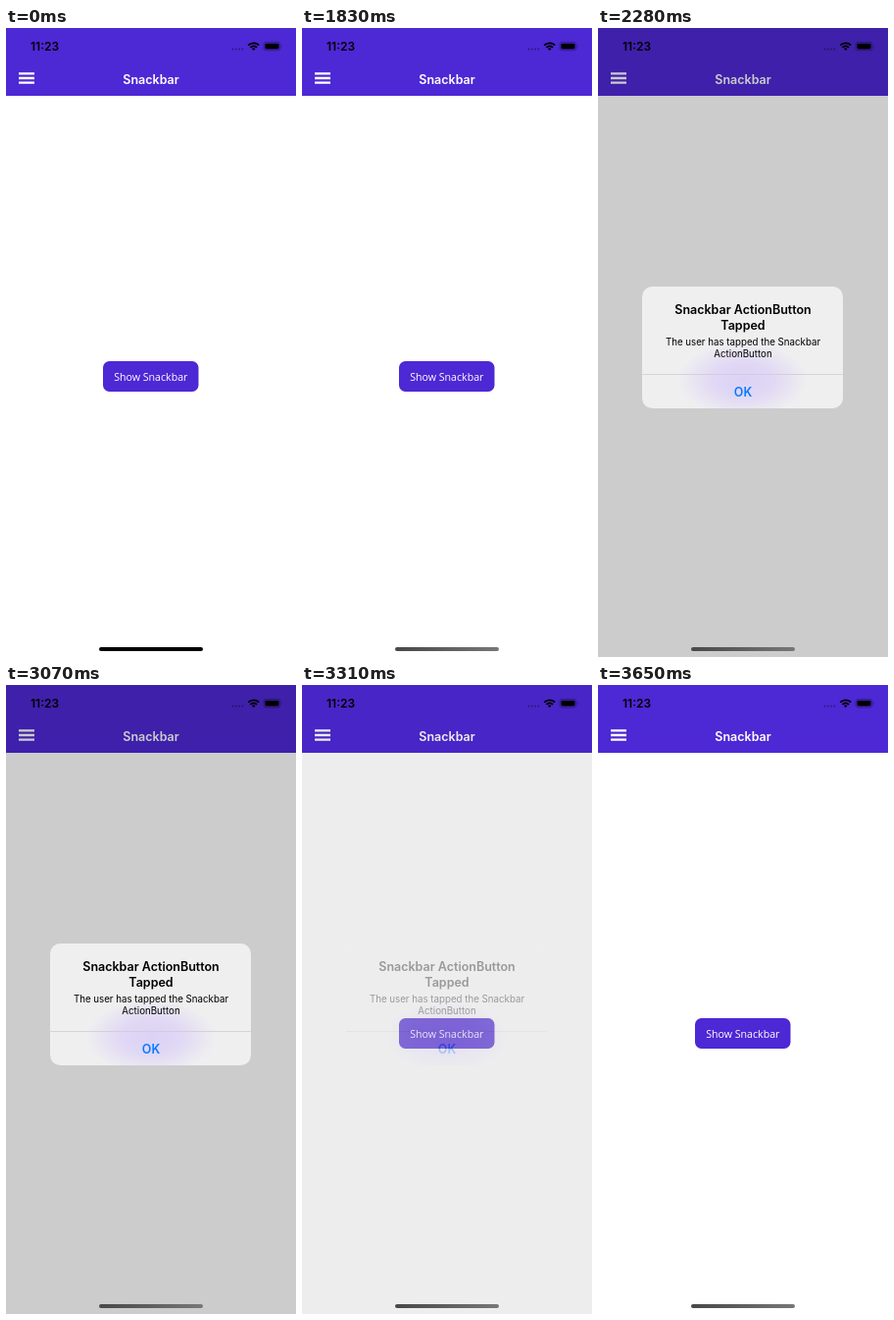
Animation of 296x640 px, one loop 3.67 s. Source, as an HTML page:

```html
<!DOCTYPE html>
<html lang="en">
<head>
<meta charset="utf-8">
<title>Snackbar</title>
<style>
  html, body { margin: 0; width: 100%; height: 100%; overflow: hidden; background: #fff; }
  svg { display: block; width: 296px; height: 640px; font-family: Inter, sans-serif; }
  .bold { font-weight: 600; font-size: 12.5px; }
  .middle { text-anchor: middle; }
</style>
</head>
<body>
<svg viewBox="0 0 296 640">
  <defs>
    <radialGradient id="glow">
      <stop offset="0" stop-color="#dcd2f6"/>
      <stop offset=".45" stop-color="#dcd2f6" stop-opacity=".8"/>
      <stop offset="1" stop-color="#dcd2f6" stop-opacity="0"/>
    </radialGradient>
    <linearGradient id="worn">
      <stop offset="0" stop-color="#484848"/>
      <stop offset="1" stop-color="#777"/>
    </linearGradient>
    <clipPath id="card"><rect x="45" y="263" width="205" height="124" rx="10.5"/></clipPath>
  </defs>

  <rect width="296" height="640" fill="#fff"/>
  <rect width="296" height="69" fill="#4d28d5"/>
  <path d="M13 46.4h16M13 51h16M13 55.6h16" stroke="#fff" stroke-width="2.3"/>
  <text class="bold middle" x="148" y="57" fill="#fff">Snackbar</text>
  <rect x="99" y="339" width="97.5" height="31" rx="6.5" fill="#4d28d5"/>
  <text class="middle" x="147.8" y="358.6" fill="#fff" font-size="10.63" font-family="Open Sans, sans-serif">Show Snackbar</text>

  <g id="snackbar">
    <rect x="30.5" y="543" width="235" height="56" rx="8" fill="#f00"/>
    <g fill="#2f6a00" font-size="10.6" font-weight="500" letter-spacing="3">
      <text x="46" y="569">This is a</text>
      <text x="46" y="581">Snackbar</text>
    </g>
    <text x="146" y="575" fill="#ff0" font-size="10.35">Click Here to Dismiss</text>
  </g>

  <rect id="dim" width="296" height="640" fill="#000"/>

  <g id="alert">
    <g clip-path="url(#card)">
      <rect x="45" y="263" width="205" height="124" fill="#efeff0"/>
      <ellipse cx="148" cy="358" rx="66" ry="38" fill="url(#glow)"/>
    </g>
    <path d="M45 352.5h205" stroke="#cfccd6" stroke-width=".8"/>
    <g class="middle">
      <g class="bold">
        <text x="148" y="291">Snackbar ActionButton</text>
        <text x="148" y="307">Tapped</text>
        <text x="148" y="374.6" fill="#0a7aff">OK</text>
      </g>
      <g font-size="9.72">
        <text x="148" y="323">The user has tapped the Snackbar</text>
        <text x="148" y="335">ActionButton</text>
      </g>
    </g>
  </g>

  <!-- status bar and home indicator stay above the dimming -->
  <text class="bold" x="25" y="23" style="font-size:12px">11:23</text>
  <g opacity=".4">
    <circle cx="231.5" cy="21.5" r=".9"/><circle cx="234.8" cy="21.5" r=".9"/>
    <circle cx="238.1" cy="21.5" r=".9"/><circle cx="241.4" cy="21.5" r=".9"/>
  </g>
  <g fill="none" stroke="#000" stroke-width="1.8">
    <path d="M247.2 17.6a7.8 7.8 0 0 1 11 0"/>
    <path d="M249.4 19.8a4.7 4.7 0 0 1 6.6 0"/>
  </g>
  <path d="M250.9 21.1a2.6 2.6 0 0 1 3.6 0l-1.8 1.9z"/>
  <rect x="263" y="14.4" width="17" height="8.4" rx="2.5" fill="none" stroke="#000" stroke-opacity=".4" stroke-width=".8"/>
  <rect x="264.4" y="15.8" width="14.2" height="5.6" rx="1.4"/>
  <path d="M281.2 17.2q1.5 1.4 0 2.8z" opacity=".4"/>
  <rect id="home" x="95" y="630" width="106" height="4" rx="2"/>
</svg>
<script>
  const LOOP = 3670;
  const SHOW = 700, HIDE = 1830;
  // [start ms, alert opacity, alert scale]
  const alertSteps = [
    [0, 0, 1],
    [1940, .3, 1.12], [2050, .72, 1.05], [2160, .94, 1.01], [2280, 1, 1],
    [3310, .35, 1], [3420, .08, 1], [3530, 0, 1]
  ];
  const byId = id => document.getElementById(id);
  const snackbar = byId('snackbar'), dim = byId('dim'), alertBox = byId('alert'), home = byId('home');

  function draw(now) {
    const t = now % LOOP;
    const [, opacity, scale] = alertSteps.filter(([start]) => t >= start).pop();
    snackbar.setAttribute('opacity', t >= SHOW && t < HIDE ? 1 : 0);
    dim.setAttribute('opacity', .2 * opacity);
    alertBox.setAttribute('opacity', opacity);
    alertBox.setAttribute('transform', `translate(147.5 325) scale(${scale}) translate(-147.5 -325)`);
    home.setAttribute('fill', t < SHOW ? '#000' : 'url(#worn)');
  }

  const begin = performance.now();
  function tick() {
    draw(performance.now() - begin);
    requestAnimationFrame(tick);
  }
  tick();
</script>
</body>
</html>
```
